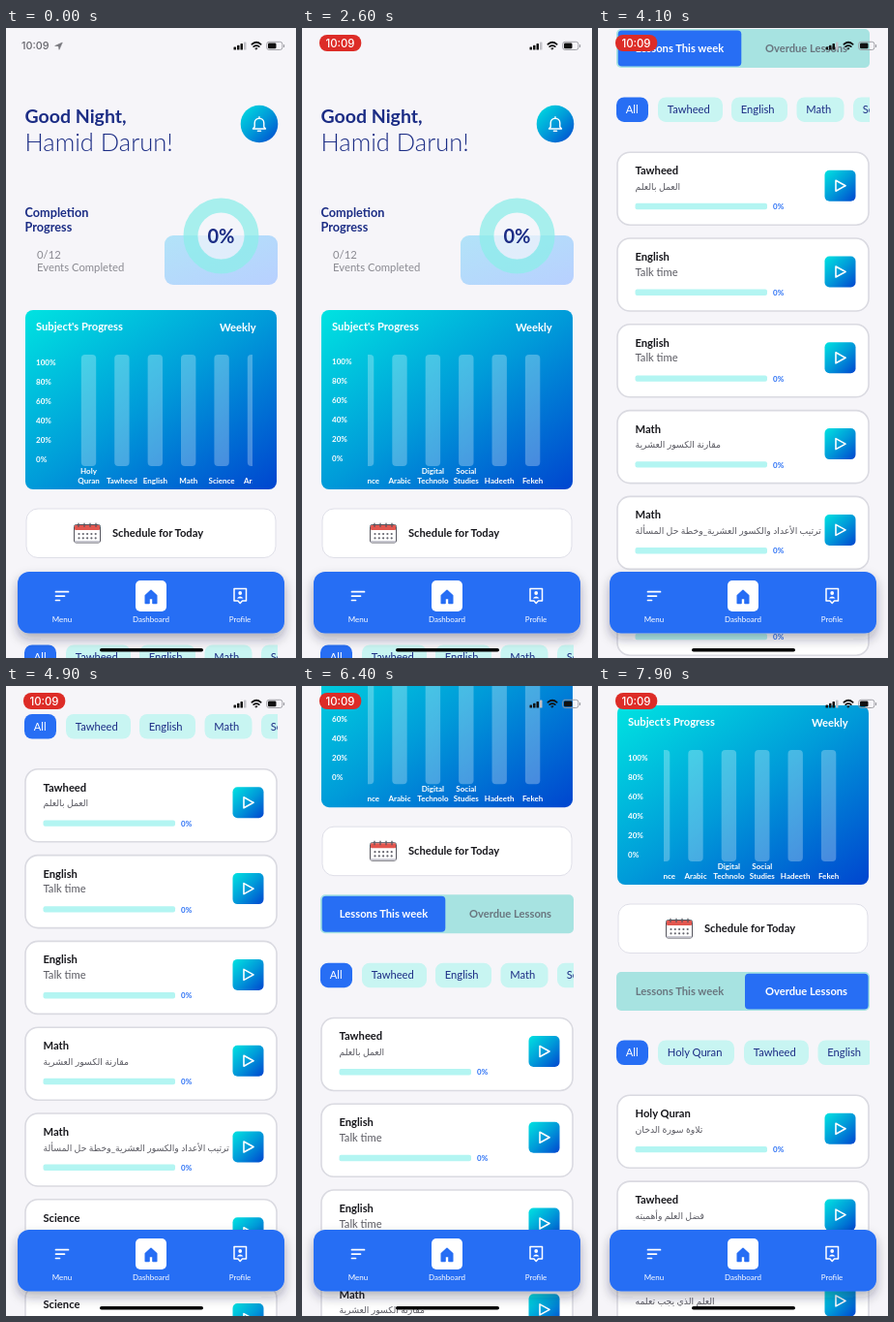
Write an HTML page that moves like this. It is 300 px wide and 650 px high and loops after 8 s.

```html
<!DOCTYPE html>
<html lang="en">
<head>
<meta charset="utf-8">
<title>Lesson dashboard</title>
<style>
  html, body { margin: 0; width: 100%; height: 100%; overflow: hidden; background: #f6f5f9; }
  svg { display: block; width: 100vw; height: 100vh; font-family: Lato, "DejaVu Sans", sans-serif; }
  .bar { font-family: Inter, sans-serif; }
</style>
</head>
<body>
<svg id="stage" viewBox="0 0 300 650"></svg>
<script>
const NAVY = '#1c2d85', BLUE = '#276ef4', TEAL = '#a7e3e1', MINT = '#c8f5f2', PERIOD = 8000;

const text = (x, y, s, size, fill, weight = 400, anchor = 'start') =>
  `<text x="${x}" y="${y}" font-size="${size}" fill="${fill}" font-weight="${weight}" text-anchor="${anchor}">${s}</text>`;
const rect = (x, y, w, h, r, fill, extra = '') =>
  `<rect x="${x}" y="${y}" width="${w}" height="${h}" rx="${r}" fill="${fill}" ${extra}/>`;
const path = (d, fill, stroke = 'none', width = 1) =>
  `<path d="${d}" fill="${fill}" stroke="${stroke}" stroke-width="${width}" stroke-linecap="round" stroke-linejoin="round"/>`;
const circle = (x, y, r, fill, extra = '') => `<circle cx="${x}" cy="${y}" r="${r}" fill="${fill}" ${extra}/>`;
const range = (n, f) => Array.from({ length: n }, (_, i) => f(i)).join('');
const gradient = (id, ...stops) => `<linearGradient id="${id}" x2="1" y2="1">` +
  stops.map((c, i) => `<stop offset="${i / (stops.length - 1)}" stop-color="${c}"/>`).join('') + '</linearGradient>';
const clip = (id, x, y, w, h) => `<clipPath id="${id}">${rect(x, y, w, h, 0, '#000')}</clipPath>`;

const defs = `<defs>
  ${gradient('deep', '#00e3e1', '#009bd9', '#0045cf')}
  ${gradient('pale', '#b2e3f8', '#b8d0ff')}
  ${clip('plot', 68, 320, 187, 156)}${clip('chips', 0, 600, 281, 90)}
  <filter id="shade" x="-10%" y="-30%" width="120%" height="180%">
    <feDropShadow dx="0" dy="6" stdDeviation="6" flood-color="#223" flood-opacity=".33"/></filter></defs>`;

const header = text(19.5, 98, 'Good Night,', 19.5, NAVY, 700) +
  text(19.5, 127, 'Hamid Darun!', 25.5, NAVY, 300) +
  circle(262, 99, 19.3, 'url(#deep)') +
  path('M255.5 104H268.5L266.8 102V98A4.8 4.8 0 0 0 257.2 98V102ZM262 92.5V91.8', 'none', '#fff', 1.4) +
  path('M260.5 106.3H263.5', 'none', '#fff', 1.6) +
  text(19.5, 195, 'Completion', 12.7, NAVY, 700) + text(19.5, 210, 'Progress', 12.7, NAVY, 700) +
  text(32, 238, '0/12', 11.3, '#8b8b92') + text(32, 251, 'Events Completed', 11.3, '#8b8b92') +
  rect(164, 214, 117, 51, 9, 'url(#pale)') +
  circle(222.5, 214.5, 24.5, '#f4f5fb', 'fill-opacity=".7"') +
  circle(222.5, 214.5, 31.5, 'none', 'stroke="#8deeea" stroke-opacity=".75" stroke-width="15"') +
  text(222.5, 222, '0%', 20, NAVY, 700, 'middle');

const subjects = ['Holy Quran', 'Tawheed', 'English', 'Math', 'Science', 'Arabic',
  'Digital Technolo', 'Social Studies', 'Hadeeth', 'Fekeh'];
const bars = subjects.map((name, i) => {
  const x = 85.5 + i * 34.4, lines = name.split(' ').reverse();
  return rect(x - 7.7, 337, 15.4, 115, 4, '#fff', 'fill-opacity=".28"') +
    lines.map((s, k) => text(x, 470 - k * 10, s, 8, '#fff', 700, 'middle')).join('');
}).join('');
const chart = rect(20, 291, 260, 185, 8, 'url(#deep)') +
  text(31, 312, "Subject's Progress", 11.2, '#fff', 700) + text(221, 313, 'Weekly', 11.2, '#fff', 700) +
  range(6, i => text(31, 347.5 + i * 20, 100 - i * 20 + '%', 8, '#fff', 700)) +
  `<g clip-path="url(#plot)"><g id="bars">${bars}</g></g>`;

const schedule = rect(21, 496, 258, 50.5, 12, '#fff', 'stroke="#dfdfe8"') +
  rect(70.5, 512.5, 27, 18.5, 2, '#fff', 'stroke="#55555e"') + rect(71, 513, 26, 5, 1, '#e2564f') +
  rect(71, 529, 26, 1.6, 0, '#c9c9d2') +
  range(4, i => path(`M${75 + i * 6} 511V514.5`, 'none', '#55555e', 1.2)) +
  range(10, i => circle(75.5 + i % 5 * 4.3, 522 + (i > 4) * 4.3, 1.1, '#66666f')) +
  text(110, 525.3, 'Schedule for Today', 11.2, '#17171c', 700);

// One tab's complete lower half: switch, filter chips and lesson cards
function panel(id, active, chips, lessons) {
  const tab = (i, s) => (i === active ? rect(20.7 + i * 131.3, 567.7, 127.6, 36.8, 4, BLUE) : '') +
    text(84.5 + i * 131, 590.3, s, 11.2, i === active ? '#fff' : '#69767f', 700, 'middle');
  const chip = ([s, x, w], i) => rect(x, 636.5, w, 25.5, 8, i ? MINT : BLUE) +
    text(x + 9.8, 653, s, 11.2, i ? NAVY : '#fff');
  const card = ([title, sub], i) => `<g transform="translate(0 ${693.3 + i * 88.8})">` +
    rect(20, 0, 260, 75, 13, '#fff', 'stroke="#dadae1" stroke-width="1.6"') +
    text(38.5, 23, title, 11.2, '#17171c', 700) +
    text(38.5, 38.6, sub, sub < '~' ? 11.2 : 9.3, '#5a5a62') +
    rect(38.5, 52.6, 136.5, 6.4, 2, '#b3f5f2') + text(181, 59, '0%', 8, BLUE, 700) +
    rect(234.5, 18.5, 32, 32, 5, 'url(#deep)') +
    path('M246 29L256 34.5L246 40Z', 'none', '#fff', 1.6) + '</g>';
  return `<g id="${id}">` + rect(19, 566, 262, 40, 5, TEAL) +
    tab(0, 'Lessons This week') + tab(1, 'Overdue Lessons') +
    `<g clip-path="url(#chips)">${chips.map(chip).join('')}</g>` + lessons.map(card).join('') + '</g>';
}

const week = panel('week', 0,
  [['All', 19, 33], ['Tawheed', 62, 67], ['English', 138, 58], ['Math', 205.5, 49], ['Science', 264, 58]],
  [['Tawheed', 'العمل بالعلم'], ['English', 'Talk time'], ['English', 'Talk time'],
   ['Math', 'مقارنة الكسور العشرية'], ['Math', 'ترتيب الأعداد والكسور العشرية_وخطة حل المسألة'],
   ['Science', 'خصائص المادة وتغيراتها في الطبيعة من حولنا'], ['Science', 'التغيرات الفيزيائية والكيميائية للمادة']]);
const overdue = panel('overdue', 1,
  [['All', 19, 33], ['Holy Quran', 62, 79], ['Tawheed', 151, 67], ['English', 227.5, 58]],
  [['Holy Quran', 'تلاوة سورة الدخان'], ['Tawheed', 'فضل العلم وأهميته'], ['Tawheed', 'العلم الذي يجب تعلمه']]);

const nav = rect(12, 561, 276, 63.5, 12, BLUE, 'filter="url(#shade)"') +
  [14, 10, 5].map((w, i) => path(`M51.5 ${581.7 + i * 4.4}h${w - 1}`, 'none', '#fff', 1.7)).join('') +
  rect(134, 570, 32, 32, 5, '#fff') +
  path('M144.3 585.5L150 580.3L155.7 585.5V593.5H152V588.5H148V593.5H144.3Z', BLUE, BLUE, 1.6) +
  path('M236 578.5H248.5V591H244.5L242.2 593.5L240 591H236Z', 'none', '#fff', 1.5) +
  circle(242.2, 583, 1.9, '#fff') + path('M238.8 588.6Q242.2 584.6 245.6 588.6Z', '#fff') +
  ['Menu', 'Dashboard', 'Profile'].map((s, i) => text(58 + i * 92, 613, s, 8, '#fff', 400, 'middle')).join('') +
  rect(97, 640, 107, 3.6, 1.8, '#000');

const status = `<g class="bar">
  <g id="plain">${text(16, 22.3, '10:09', 10.8, '#64646a', 500)}${path('M51 18.3L58.3 15L55 22.3L54.4 18.9Z', '#77777d', '#77777d', .6)}</g>
  <g id="pill">${rect(18, 7, 43.3, 17, 8, '#dd2c27')}
    <g id="record">${circle(39.5, 15.5, 4.8, 'none', 'stroke="#fff" stroke-width="1.2"')}${circle(39.5, 15.5, 2.2, '#fff')}</g>
    <g id="clock">${text(39.5, 19.8, '10:09', 11.4, '#fff', 500, 'middle')}</g></g>
  ${range(4, i => rect(235.5 + i * 3.5, 19.5 - i * 1.7, 2.5, 3 + i * 1.7, .6, i < 3 ? '#111' : '#c2c2c8'))}
  ${path('M254.3 16.8Q259 12.7 263.7 16.8M256.2 19.2Q259 16.9 261.8 19.2', 'none', '#111', 1.7)}
  ${path('M257.8 20.9Q259 20 260.2 20.9L259 22.2Z', '#111', '#111', .5)}
  ${rect(269.7, 14.3, 16.2, 8.2, 2.4, 'none', 'stroke="#99999f" stroke-width=".9"')}
  ${rect(271, 15.6, 8.5, 5.6, 1.3, '#111')}${rect(287, 17, 1.1, 3, .5, '#99999f')}</g>`;

const $ = id => document.getElementById(id);
$('stage').innerHTML = defs + `<g id="page">${header}${chart}${schedule}${week}${overdue}</g>` + nav + status;

// Smooth curve through [time, value] keys that never overshoots
function curve(keys) {
  const slope = i => (keys[i + 1][1] - keys[i][1]) / (keys[i + 1][0] - keys[i][0]);
  const tangent = i => {
    if (i < 1 || i > keys.length - 2) return 0;
    const a = slope(i - 1), b = slope(i);
    return a * b > 0 ? 2 * a * b / (a + b) : 0;
  };
  return t => {
    const last = keys.length - 1;
    if (t <= keys[0][0]) return keys[0][1];
    if (t >= keys[last][0]) return keys[last][1];
    const i = keys.findIndex(k => k[0] > t) - 1, [t0, v0] = keys[i], [t1, v1] = keys[i + 1];
    const d = t1 - t0, u = (t - t0) / d, w = 1 - u;
    return v0 * w * w * (1 + 2 * u) + v1 * u * u * (3 - 2 * u) +
      d * u * w * (tangent(i) * w - tangent(i + 1) * u);
  };
}
const scroll = curve([[2600, 0], [3300, 353], [4100, 565], [4900, 607.5], [5500, 607.5], [6400, 351], [7100, 271]]);
const slide = curve([[1100, 0], [1400, 32.5], [2200, 156.5]]);

const show = (id, on) => $(id).setAttribute('display', on ? 'inline' : 'none');
function draw(now) {
  const t = now % PERIOD;
  $('page').setAttribute('transform', `translate(0 ${-scroll(t)})`);
  $('bars').setAttribute('transform', `translate(${-slide(t)} 0)`);
  const recording = t >= 500, late = t >= 7500;
  show('plain', !recording);
  show('pill', recording);
  show('record', t < 2500);
  show('clock', t >= 2500);
  show('week', !late);
  show('overdue', late);
}
(function tick() {
  draw(performance.now());
  requestAnimationFrame(tick);
})();
</script>
</body>
</html>
```
